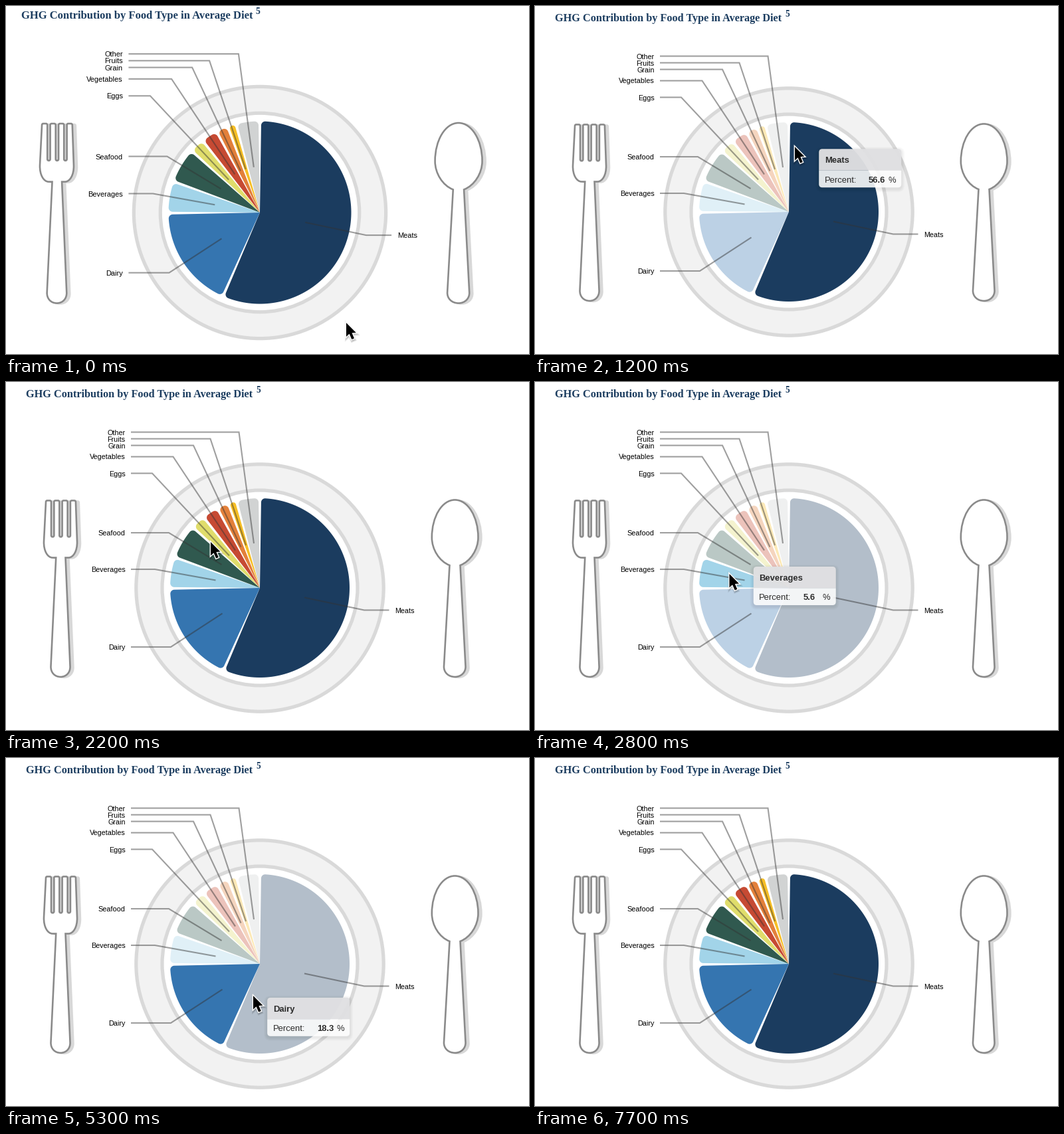
Write a matplotlib script that moves like this. It is 787 px wide and 524 px high and loops after 7800 ms.

```python
import numpy as np
import matplotlib.pyplot as plt
from matplotlib.animation import FuncAnimation
from matplotlib.patches import Circle, PathPatch, Polygon
from matplotlib.path import Path
from matplotlib.transforms import Affine2D

W, H, DPI = 787, 524, 72  # at 72 dpi one point is one pixel
STEP, FRAMES = 100, 78
CX, CY, R = 382, 310, 135
PAD, CORNER = 0.03, 6
DIM = 0.33
INK, OUTLINE, SHADE = "#1b3c5f", "#8a8a8a", "#d8d8d8"

# name, percent, colour, label line from the text to the slice
SLICES = [
    ("Meats", 56.6, INK, [(576.5, 343.5), (539, 343.5), (449, 324.5)]),
    ("Dairy", 18.3, "#3575b0", [(188, 399), (248, 399), (325.5, 348.5)]),
    ("Beverages", 5.6, "#a2d4e9", [(188, 282), (224, 282), (315.5, 298.5)]),
    ("Seafood", 6.2, "#30594f", [(188, 227), (245, 227), (324.5, 275)]),
    ("Eggs", 2.6, "#e0dd6b", [(188, 137.5), (220, 137.5), (336, 261.5)]),
    ("Vegetables", 2.9, "#c64a33", [(188, 112.5), (251.5, 112.5), (345, 253.5)]),
    ("Grain", 2.1, "#e3803a", [(188, 95.5), (282, 95.5), (353.5, 248.5)]),
    ("Fruits", 1.5, "#f6bf26", [(188, 85.5), (307.5, 85.5), (361, 246)]),
    ("Other", 4.2, "#d1d3d3", [(188, 75.5), (350.5, 75.5), (373, 243)]),
]
PERCENT = {s[0]: s[1] for s in SLICES}

# time, x, y of the pointer tip
TRACK = np.array([
    (0, 509.6, 473), (200, 505, 462), (500, 456, 350), (800, 405, 232),
    (1000, 394, 213), (1200, 391, 212), (1500, 385, 207), (1700, 354, 205),
    (2000, 321, 224), (2200, 308, 241), (2500, 297, 262), (2900, 291, 298),
    (3300, 320, 349), (3500, 349, 361), (3700, 349, 361), (4300, 345, 359),
    (4900, 350, 360), (5200, 361, 358), (5300, 372, 358), (5400, 432, 370),
    (5500, 545, 395), (5600, 611, 409),
])
HIDE = 6900

HOVER = [
    (500, 1500, "Meats"), (1600, 1800, "Other"), (1900, 2000, "Vegetables"),
    (2300, 2700, "Seafood"), (2700, 3100, "Beverages"),
    (3200, 5350, "Dairy"), (5400, 5500, "Meats"),
]

fig = plt.figure(figsize=(W / DPI, H / DPI), dpi=DPI, facecolor="white")
ax = fig.add_axes([0, 0, 1, 1])
ax.axis("off")
texts = []


def label(x, y, s, size, font="Liberation Sans", **kw):
    t = ax.text(x, y, s, fontsize=size, fontfamily=font, va="baseline", **kw)
    texts.append((t, size))
    return t


def shape(start, *segs):
    """Closed path: two numbers make a line, four or six a curve."""
    pts, codes = [start], [Path.MOVETO]
    for seg in segs:
        n = len(seg) // 2
        pts += [seg[2 * i:2 * i + 2] for i in range(n)]
        codes += [{1: Path.LINETO, 2: Path.CURVE3, 3: Path.CURVE4}[n]] * n
    return Path(pts + [start], codes + [Path.CLOSEPOLY])


def box(x0, y0, x1, y1, top=5, bottom=5):
    a, b = top, bottom
    return shape((x0 + a, y0), (x1 - a, y0), (x1, y0, x1, y0 + a),
                 (x1, y1 - b), (x1, y1, x1 - b, y1), (x0 + b, y1),
                 (x0, y1, x0, y1 - b), (x0, y0 + a), (x0, y0, x0 + a, y0))


def wedge(a0, a1):
    """Slice outline, angles clockwise from the top, outer corners rounded."""
    a0, a1 = a0 + PAD / 2, a1 - PAD / 2
    s = np.sin(min(a1 - a0, np.pi) / 2)
    rc = min(CORNER, R * s / (1 + s))
    d = np.arcsin(rc / (R - rc))

    def polar(r, a):
        return np.column_stack([r * np.sin(a), -r * np.cos(a)])

    def corner(mid, lo, hi):
        return polar(R - rc, np.full(10, mid)) + polar(rc, np.linspace(lo, hi, 10))

    pts = np.vstack([
        np.zeros((1, 2)),
        corner(a0 + d, a0 - np.pi / 2, a0 + d),
        polar(R, np.linspace(a0 + d, a1 - d, 120)),
        corner(a1 - d, a1 - d, a1 + np.pi / 2),
    ])
    return pts + (CX, CY)


def cutlery(path):
    shadow = Affine2D().translate(5, 1).transform_path(path)
    ax.add_patch(PathPatch(shadow, fc=SHADE, ec=SHADE, lw=2.4))
    ax.add_patch(PathPatch(path, fc="white", ec=OUTLINE, lw=2.6))


def fork():
    wide, slot, x, top, low = 8, 4.3, 60, 178.5, 233
    segs = []
    for i in range(4):
        segs += [(x, top + 2), (x, top, x + 2, top), (x + wide - 2, top),
                 (x + wide, top, x + wide, top + 2)]
        x += wide
        if i < 3:
            segs += [(x, low - 2), (x, low + 1, x + slot, low + 1, x + slot, low - 2)]
            x += slot
    segs += [(107, 240), (107.5, 255, 101, 264.5, 94, 264.5), (89.5, 264.5),
             (96.5, 428), (97, 437, 91, 444, 82, 444),
             (73, 444, 67, 437, 67.5, 428), (75.2, 264.5), (70, 264.5),
             (63, 264.5, 56.5, 255, 57, 240)]
    return shape((57, 240), *segs)


def spoon():
    return shape(
        (667.5, 276), (652, 270, 640.8, 252, 640.8, 234),
        (640.8, 203, 656, 177.5, 675.5, 177.5),
        (695, 177.5, 710.5, 203, 710.5, 234), (710.5, 252, 699, 270, 683.5, 276),
        (691.5, 428), (692, 437, 685, 444, 675.5, 444),
        (665.5, 444, 658.5, 437, 659, 428))


label(30, 23, "GHG Contribution by Food Type in Average Diet", 16.3,
      "Liberation Serif", weight="bold", color=INK)
label(376, 16.5, "5", 13.5, "Liberation Serif", weight="bold", color=INK)

cutlery(fork())
cutlery(spoon())
ax.add_patch(Circle((CX, CY), 186.2, fc="#f2f2f2", ec="#d9d9d9", lw=5.2))
ax.add_patch(Circle((CX, CY), 147, fc="white", ec="#d9d9d9", lw=5.2))

wedges = {}
angle = 0
for name, pct, color, pts in SLICES:
    end = angle + pct / 100 * 2 * np.pi
    wedges[name] = ax.add_patch(Polygon(wedge(angle, end), fc=color, lw=0))
    angle = end
    x, y = pts[0]
    ax.plot(*zip(*pts), color="#333333", alpha=0.47, lw=2.1,
            solid_capstyle="butt", solid_joinstyle="miter", zorder=3)
    right = x > CX
    label(x + 9 if right else x - 8.5, y + 4, name, 10.8,
          ha="left" if right else "right", color="black")

# Tooltip, built at the origin and moved as one
tip_move, arrow_move = Affine2D(), Affine2D()
tip_tf, arrow_tf = tip_move + ax.transData, arrow_move + ax.transData
tip = []


def tip_box(path, color, alpha):
    p = PathPatch(path, fc=color, lw=0, transform=tip_tf, zorder=5)
    tip.append((ax.add_patch(p), alpha))


def tip_text(x, y, s, weight="normal"):
    t = label(x, y, s, 13, weight=weight, color="#2b2b2b", transform=tip_tf, zorder=6)
    tip.append((t, 1))
    return t


for g in range(1, 6):
    tip_box(box(-g, 2 - g, 124 + g, 60 + g, 5 + g, 5 + g), "black", 0.014)
tip_box(box(0, 0, 124, 32.5, 5, 0), "#e1e1e3", 0.96)
tip_box(box(0, 32.5, 124, 58, 0, 5), "white", 0.88)
tip_name = tip_text(8.5, 21, "", "bold")
tip_text(8.5, 50.5, "Percent:")
tip_value = tip_text(74.5, 50.5, "", "bold")
tip_text(104, 50.5, "%")

ARROW = np.array([(0, 0), (0, 20.5), (4.6, 16.3), (8.2, 24.5), (11.8, 23),
                  (8.4, 15), (14.5, 14.6)])
arrow = [Polygon(ARROW + (0.5, 2), fc="black", ec="black", alpha=0.1, lw=w)
         for w in (5, 3)]
arrow += [Polygon(ARROW, fc="white", ec="white", lw=2.8),
          Polygon(ARROW, fc="black", lw=0)]
for p in arrow:
    p.set(transform=arrow_tf, zorder=8)
    ax.add_patch(p)


def pointer(t):
    return [np.interp(t, TRACK[:, 0], TRACK[:, i]) for i in (1, 2)]


def approach(value, goal, step):
    return value + np.clip(goal - value, -step, step)


def timeline():
    """Slice opacities and tooltip state for the whole loop."""
    level, shown, fade, out = dict.fromkeys(wedges, 1.0), "Meats", 0.0, []
    for n in range(FRAMES):
        t = n * STEP
        over = next((s for a, b, s in HOVER if a <= t < b), None)
        level = {k: approach(v, 1 if over in (None, k) else DIM, 0.34)
                 for k, v in level.items()}
        fade = approach(fade, 1 if over else 0, 0.5)
        shown = over or shown
        out.append((level, shown, fade))
    return out


STATES = timeline()


def draw(n):
    t = n * STEP
    left = (1 - min(t / 500, 1)) ** 3
    z, cy = 1 + 0.0185 * left, CY + left
    ax.set_xlim(CX - CX / z, CX + (W - CX) / z)
    ax.set_ylim(CY + (H - cy) / z, CY - cy / z)
    for text, size in texts:
        text.set_fontsize(size * z)

    level, shown, fade = STATES[n]
    for name, patch in wedges.items():
        patch.set_alpha(level[name])

    x, y = pointer(t - 150)
    tip_move.clear().translate(x + 34, y + 2.5)
    tip_name.set_text(shown)
    tip_value.set_text(f"{PERCENT[shown]:.1f}")
    for artist, alpha in tip:
        artist.set_visible(fade > 0)
        artist.set_alpha(alpha * fade)

    arrow_move.clear().translate(*pointer(t))
    for p in arrow:
        p.set_visible(t < HIDE)
    return []


anim = FuncAnimation(fig, draw, frames=FRAMES, init_func=lambda: [],
                     interval=STEP, repeat=True, repeat_delay=0, blit=False)
plt.show()
```
